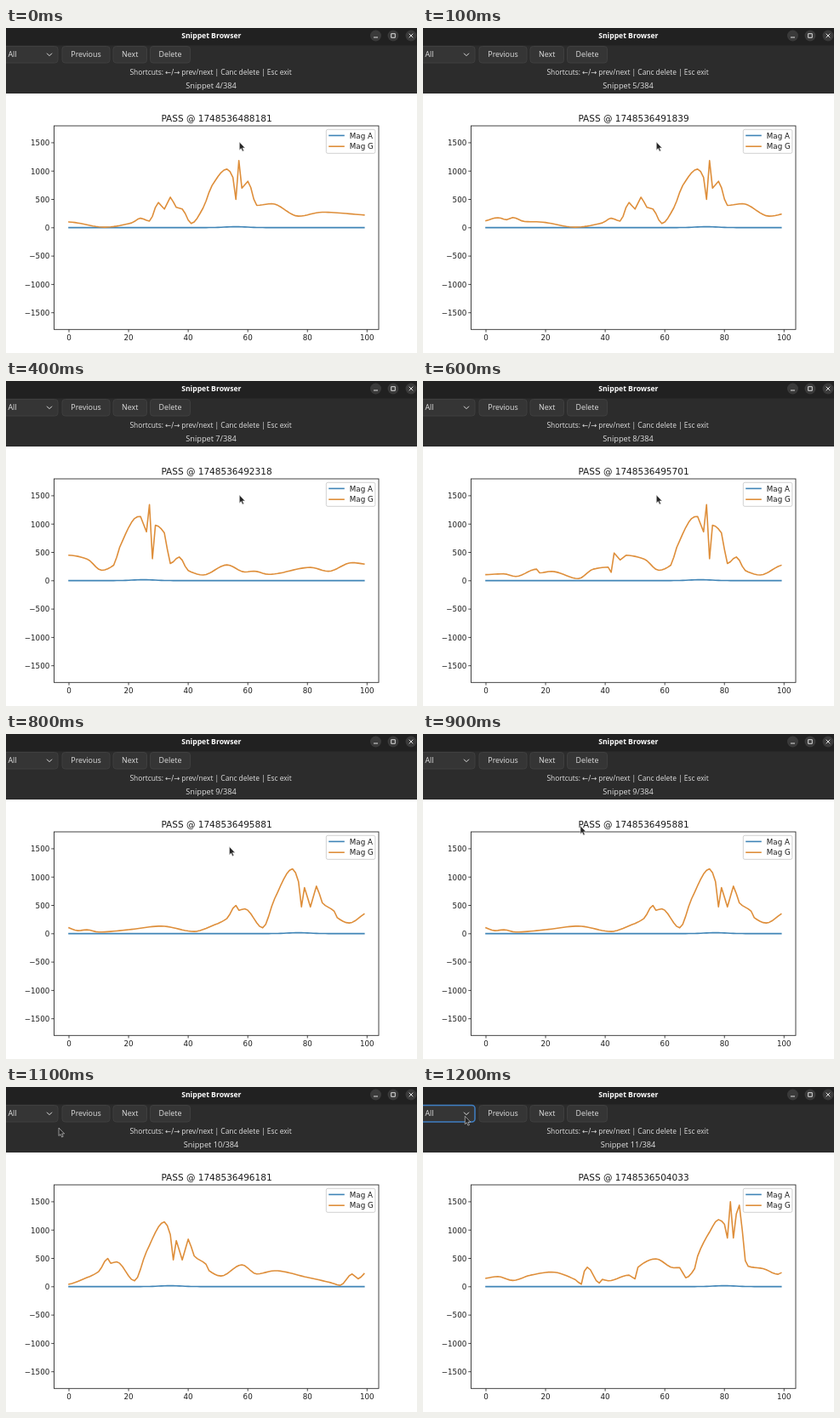
These frames come from a looping animation (483 px wide and 382 px high, 1300 ms). An HTML page:

```html
<!DOCTYPE html>
<html lang="en">
<head>
<meta charset="utf-8">
<title>Snippet Browser</title>
<style>
  html, body { margin: 0; width: 100%; height: 100%; overflow: hidden; background: #fff; }
  svg { display: block; width: 483px; height: 382px; }
  .ui { font: 8.9px "Open Sans", "Noto Sans", sans-serif; fill: #e0e0e0; }
  .heading { font-size: 8.6px; font-weight: 700; fill: #fff; }
  .hint { font-size: 8.4px; }
  .count { font-size: 9.2px; }
  .arrows { font-family: "DejaVu Sans", sans-serif; }
  .plot { font: 8.75px "DejaVu Sans", sans-serif; fill: #1a1a1a; }
  .title { font-size: 10.5px; }
  .mid { text-anchor: middle; }
  .end { text-anchor: end; }
  .button { fill: #353535; stroke: #3f3f3f; }
  .button.focused { stroke: #3f7fc4; stroke-width: 1.5; }
  .axis { fill: none; stroke: #222; stroke-width: .85; }
  .line { fill: none; stroke-width: 1.6; stroke-linejoin: round; stroke-linecap: square; }
  .a { stroke: #3f84b6; }
  .g { stroke: #de8e3a; }
  .glyph { fill: none; stroke: #ddd; }
</style>
</head>
<body>
<svg viewBox="0 0 483 382">
  <rect width="483" height="382" fill="#fff"/>
  <rect width="483" height="77" fill="#2c2c2c"/>
  <rect width="483" height="20.5" fill="#212121"/>
  <text class="ui heading mid" x="241.3" y="12.3">Snippet Browser</text>

  <g fill="#3a3a3a">
    <circle cx="434.5" cy="9" r="6.5"/>
    <circle cx="455" cy="9" r="6.5"/>
    <circle cx="476" cy="9" r="6.5"/>
  </g>
  <path class="glyph" d="M432 11h5M452.7 6.7h4.6v4.6h-4.6zM473.7 6.7l4.6 4.6m0-4.6l-4.6 4.6"/>

  <rect id="combo" class="button" x="-6" y="21.5" width="67" height="19.5" rx="3.5"/>
  <text class="ui" x="2.5" y="34">All</text>
  <path class="glyph" d="M48 29.7l3 3 3-3"/>
  <g id="buttons"></g>
  <text class="ui hint mid" x="240.6" y="54.6">Shortcuts: <tspan class="arrows">←/→</tspan> prev/next | Canc delete | Esc exit</text>
  <text id="counter" class="ui count mid" x="241" y="71.3"></text>

  <text id="title" class="plot title mid" x="247.5" y="109.8"></text>
  <g id="axes"></g>
  <path id="magA" class="line a"/>
  <path id="magG" class="line g"/>
  <rect class="axis" x="56.5" y="115" width="381.5" height="239.3"/>

  <rect x="376.3" y="119.3" width="57.6" height="28" rx="1.8" fill="#fff" fill-opacity=".8" stroke="#ccc" stroke-width=".9"/>
  <path class="line a" d="M380 126.4h17"/>
  <path class="line g" d="M380 139.2h17"/>
  <text class="plot" x="403.8" y="129.6">Mag A</text>
  <text class="plot" x="403.8" y="142.4">Mag G</text>

  <path id="cursor" d="M0 0v9.4l2.1-1.9 1.5 3.4 1.6-.7-1.5-3.3h2.9z" fill="#262626" stroke="#ddd" stroke-width=".6"/>
</svg>
<script>
const $ = id => document.getElementById(id);
const LOOP = 1300;

// Key points (sample, value) of each recording; a smooth curve joins them.
const curves = {
  early: { peak: 56, keys: `-18,125 -14,178 -11,142 -9,180 -5,110 0,103 12,10 21,85 24,168
    27,118 30,445 32,330 34,540 36,360 38,330 41,75 45,350 48,745 53,1035 55,890 56,500
    57,1185 58,700 60,820 63,395 68,425 77,205 85,275 99,225` },
  second: { peak: 72, keys: `0,108 6,122 10,75 17,205 18,140 22,165 31,38 36,205 41,240 42,150
    43,490 45,368 47,450 53,385 58,185 62,275 64,590 70,1130 71,1135 73,865 74,1345 75,390
    76,980 79,845 81,305 84,420 87,180 92,103 100,280 106,155 109,170 114,113 128,235
    134,168 142,320 146,295` },
  third: { peak: 77, keys: `0,105 3,55 6,70 10,30 20,72 31,135 42,40 48,140 53,270 56,500
    57,415 59,440 65,105 69,620 75,1145 77,920 78,475 79,815 81,475 83,840 85,545 89,395
    90,285 94,190 101,388 106,225 112,283 123,165 131,70 134,25 138,225 140,140 142,230` },
  late: { peak: 80, keys: `0,150 4,180 9,112 15,205 22,260 30,125 32,45 33,275 34,345 38,65
    39,130 41,105 48,205 50,140 51,345 57,492 63,335 65,338 67,160 70,320 71,540 75,965
    78,1185 80,1105 81,860 82,1500 83,860 84,1290 85,1440 87,460 88,360 93,320 98,220 99,245` }
};

// Each snippet is a 100-sample window that starts at "from".
const snippets = [
  { at: 0,    stamp: "1748536488181", curve: "early",  from: 0 },
  { at: 100,  stamp: "1748536491839", curve: "early",  from: -18 },
  { at: 300,  stamp: "1748536492018", curve: "second", from: 4 },
  { at: 400,  stamp: "1748536492318", curve: "second", from: 47 },
  { at: 600,  stamp: "1748536495701", curve: "second", from: 0 },
  { at: 800,  stamp: "1748536495881", curve: "third",  from: 0 },
  { at: 1000, stamp: "1748536496181", curve: "third",  from: 43 },
  { at: 1200, stamp: "1748536504033", curve: "late",   from: 0 }
];
const pointer = [
  { at: 0,    x: 274.3, y: 134 },
  { at: 800,  x: 262.5, y: 132.5 },
  { at: 900,  x: 185,   y: 108 },
  { at: 1000, x: 87.8,  y: 78.5 },
  { at: 1100, x: 62,    y: 48 },
  { at: 1200, x: 49.3,  y: 34.3 }
];

const px = i => 74 + 3.503 * i;
const py = v => 234.8 - 0.0666 * v;

// Cubic interpolation that never overshoots its key points.
function smooth(keys) {
  const p = keys.split(/\s+/).map(k => k.split(",").map(Number));
  const slope = k => p[k + 1] ? (p[k + 1][1] - p[k][1]) / (p[k + 1][0] - p[k][0]) : 0;
  const tangent = k => {
    if (k === 0) return slope(0);
    if (k === p.length - 1) return slope(k - 1);
    const a = slope(k - 1), b = slope(k);
    return a * b > 0 ? 2 * a * b / (a + b) : 0;
  };
  return i => {
    let k = 0;
    while (k < p.length - 2 && p[k + 1][0] < i) k++;
    const [x0, y0] = p[k], [x1, y1] = p[k + 1];
    const w = x1 - x0, u = (i - x0) / w, r = 1 - u;
    return r * r * ((1 + 2 * u) * y0 + u * w * tangent(k)) +
      u * u * ((1 + 2 * r) * y1 - r * w * tangent(k + 1));
  };
}

function trace(value, from) {
  const points = Array.from({ length: 100 }, (_, i) =>
    px(i).toFixed(2) + " " + py(value(from + i)).toFixed(2));
  return "M" + points.join("L");
}

snippets.forEach((s, n) => {
  const { keys, peak } = curves[s.curve];
  s.no = n + 4;
  s.g = trace(smooth(keys), s.from);
  s.a = trace(i => 3 + 15 * Math.exp(-(((i - peak) / 5) ** 2)), s.from);
});

$("buttons").innerHTML = [["Previous", 66, 56], ["Next", 126, 39.5], ["Delete", 169.5, 47]]
  .map(([label, x, w]) =>
    `<rect class="button" x="${x}" y="21.5" width="${w}" height="19.5" rx="3.5"/>` +
    `<text class="ui mid" x="${x + w / 2}" y="34">${label}</text>`).join("");

let axes = "";
for (let v = 0; v <= 100; v += 20) {
  axes += `<path class="axis" d="M${px(v)} 354.3v3.2"/>` +
    `<text class="plot mid" x="${px(v)}" y="367.3">${v}</text>`;
}
for (let v = -1500; v <= 1500; v += 500) {
  axes += `<path class="axis" d="M56.5 ${py(v)}h-3.2"/>` +
    `<text class="plot end" x="51.3" y="${py(v) + 3.3}">${String(v).replace("-", "−")}</text>`;
}
$("axes").innerHTML = axes;

const current = (steps, t) => steps.filter(s => s.at <= t).pop();
let shown;

function show(s) {
  shown = s;
  $("counter").textContent = `Snippet ${s.no}/384`;
  $("title").textContent = `PASS @ ${s.stamp}`;
  $("magA").setAttribute("d", s.a);
  $("magG").setAttribute("d", s.g);
}

function draw(now) {
  const t = Math.max(0, now) % LOOP;
  const s = current(snippets, t);
  if (s !== shown) show(s);
  const p = current(pointer, t);
  $("cursor").setAttribute("transform", `translate(${p.x} ${p.y})`);
  $("combo").classList.toggle("focused", t >= 1200);
  requestAnimationFrame(draw);
}
draw(performance.now());
</script>
</body>
</html>
```
